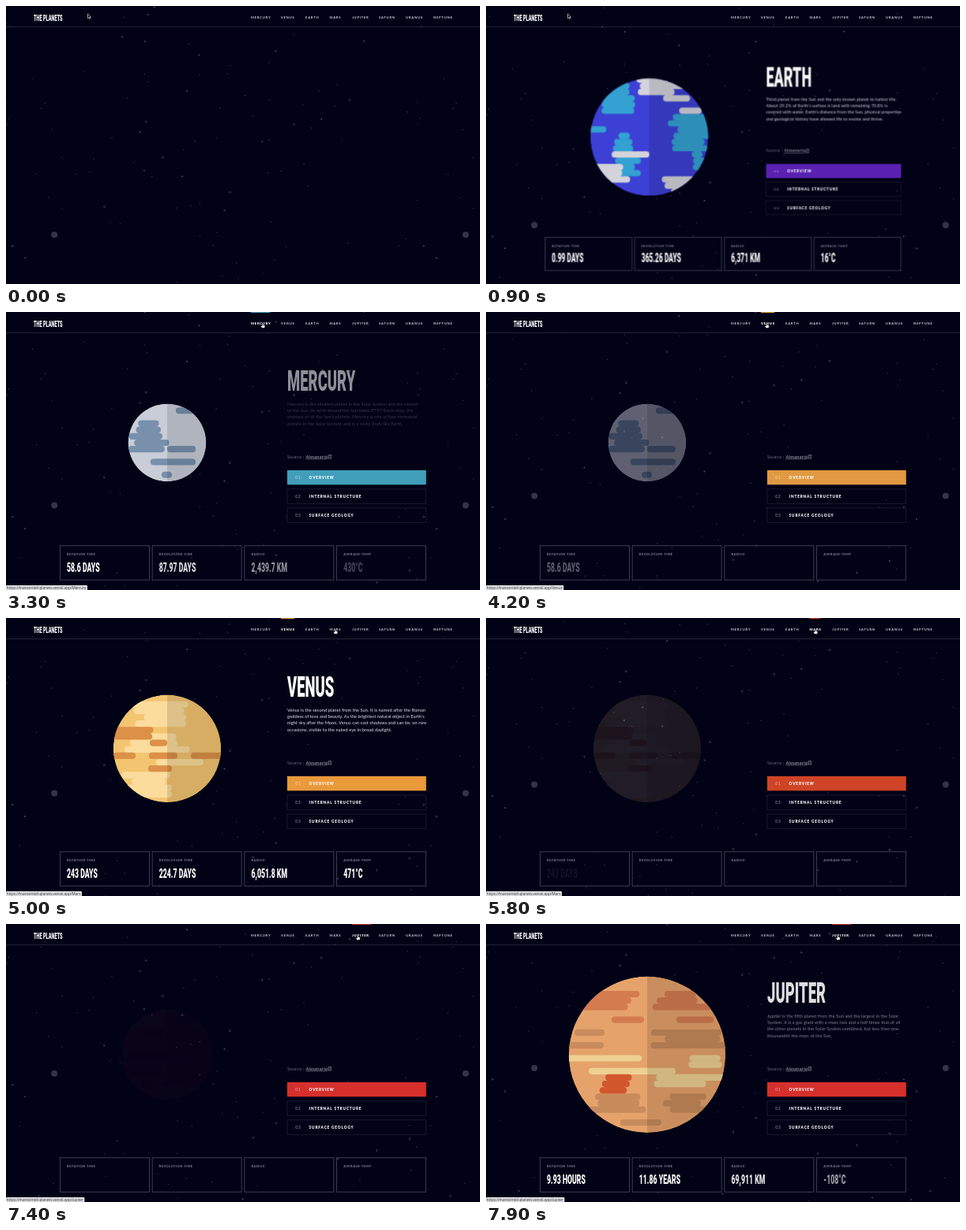
Recreate the animation shown at these times as an HTML page. Size 600 by 353 pixels, loop 8000 ms.

```html
<!DOCTYPE html>
<html lang="en">
<head>
<meta charset="utf-8">
<title>The Planets</title>
<style>
html, body { margin: 0; height: 100%; overflow: hidden; background: #020217; }
svg { display: block; width: 100vw; height: 100vh; }
text { font-family: Lato, "Open Sans", sans-serif; fill: #fff; white-space: pre; }
.display { font-family: Roboto, Inter, sans-serif; font-weight: 900; }
.nav { font-size: 4.2px; font-weight: 700; letter-spacing: .74px; fill: #d2d2da; }
.tab { font-size: 4.7px; font-weight: 900; letter-spacing: .86px; }
.num { fill-opacity: .65; font-weight: 400; }
.label { font-size: 3.9px; font-weight: 700; letter-spacing: .52px; fill: #8e8e9e; }
.body { font-size: 5.6px; letter-spacing: .09px; fill: #e8e8ee; }
.source { font-size: 5.7px; letter-spacing: .22px; fill: #70707e; }
.link { font-weight: 700; text-decoration: underline; fill: #8c8c96; }
.url { font-family: "Open Sans", sans-serif; font-size: 4.65px; fill: #333; }
</style>
</head>
<body>
<svg id="stage" viewBox="0 0 600 353" preserveAspectRatio="none"></svg>
<script>
const LOOP = 8000, CX = 204, CY = 165.8, ROW = 8.15, TILE = 520.7;
const NAV = { Mercury: 310, Venus: 348, Earth: 379, Mars: 409.5, Jupiter: 438, Saturn: 472, Uranus: 506, Neptune: 541 };
const STATS = ['ROTATION TIME', 'REVOLUTION TIME', 'RADIUS', 'AVERAGE TEMP'];

// patches: colour -> areas [first row, last row, left, right], counted from the middle row
const PLANETS = [
  { name: 'Earth', r: 76.7, mid: 164, base: '#3f42dc', accent: [92, 34, 184], enter: 250, patches: {
      '#35a6d8': [[-8, -4, 126, 194], [-3, 2, 228, 292], [3, 5, 256, 277], [0, 2, 156, 185], [-1, -1, 120, 148], [4, 6, 156, 194]],
      '#d9d9e2': [[-9, -7, 180, 258], [-6, -6, 222, 257], [-4, -4, 243, 272], [3, 3, 155, 204], [5, 7, 120, 182], [7, 9, 218, 280]] },
    text: ['Third planet from the Sun and the only known planet to harbor life.',
      'About 29.2% of Earth’s surface is land with remaining 70.8% is',
      'covered with water. Earth’s distance from the Sun, physical properties',
      'and geological history have allowed life to evolve and thrive.'],
    stats: ['0.99 DAYS', '365.26 DAYS', '6,371 KM', '16°C'] },
  { name: 'Mercury', r: 49.4, mid: 166, base: '#c8cdd8', accent: [65, 158, 187], click: 2415, patches: {
      '#7890ac': [[-5, -5, 215, 238], [-3, -2, 164, 202], [-1, 1, 145, 208], [1, 1, 204, 240], [3, 3, 183, 240], [5, 5, 197, 210]] },
    text: ['Mercury is the smallest planet in the Solar System and the closest',
      'to the Sun. Its orbit around the Sun takes 87.97 Earth days, the',
      'shortest of all the Sun’s planets. Mercury is one of four terrestrial',
      'planets in the Solar System, and is a rocky body like Earth.'],
    stats: ['58.6 DAYS', '87.97 DAYS', '2,439.7 KM', '430°C'] },
  { name: 'Venus', r: 68.2, mid: 166.8, base: '#f3c571', accent: [234, 153, 59], click: 3840, patches: {
      '#fbdc9c': [[-7, -4, 155, 245], [-2, 0, 136, 234], [2, 2, 190, 250], [4, 7, 145, 220]],
      '#dc9048': [[-3, -2, 125, 187], [-1, -1, 182, 204], [1, 1, 136, 164], [1, 1, 181, 217], [1, 1, 234, 276], [3, 3, 180, 210]] },
    text: ['Venus is the second planet from the Sun. It is named after the Roman',
      'goddess of love and beauty. As the brightest natural object in Earth’s',
      'night sky after the Moon, Venus can cast shadows and can be, on rare',
      'occasions, visible to the naked eye in broad daylight.'],
    stats: ['243 DAYS', '224.7 DAYS', '6,051.8 KM', '471°C'] },
  { name: 'Mars', r: 57.2, mid: 170, base: '#ff5f3a', accent: [207, 68, 37], click: 5330, patches: {
      '#e99a62': [[-7, -5, 146, 212], [-5, -5, 234, 243], [5, 6, 194, 252]],
      '#b4342e': [[-6, -6, 212, 248], [-4, -4, 176, 198], [0, 0, 140, 240], [2, 2, 140, 196], [2, 2, 208, 222], [4, 4, 170, 185], [4, 4, 196, 224]] },
    text: ['Mars is the fourth planet from the Sun and the second-smallest planet',
      'in the Solar System, being larger than only Mercury. In English, Mars',
      'carries the name of the Roman god of war and is often referred to as',
      'the “Red Planet”.'],
    stats: ['1.03 DAYS', '1.88 YEARS', '3,389.5 KM', '-28°C'] },
  { name: 'Jupiter', r: 99.2, mid: 170.5, base: '#e6a26b', accent: [214, 48, 44], click: 6900, patches: {
      '#d47b50': [[-10, -8, 110, 202], [-10, -8, 208, 286], [-6, -6, 159, 200], [-6, -6, 241, 288]],
      '#c88b5b': [[-4, -4, 112, 150], [-2, -2, 100, 149], [-4, -2, 206, 306], [6, 8, 130, 206], [6, 8, 214, 284], [10, 10, 170, 222]],
      '#eed091': [[0, 0, 100, 197], [2, 2, 130, 240], [0, 1, 235, 320], [3, 4, 188, 310]],
      '#d2572d': [[3, 5, 141, 186]] },
    text: ['Jupiter is the fifth planet from the Sun and the largest in the Solar',
      'System. It is a gas giant with a mass two and a half times that of all',
      'the other planets in the Solar System combined, but less than one-',
      'thousandth the mass of the Sun.'],
    stats: ['9.93 HOURS', '11.86 YEARS', '69,911 KM', '-108°C'] }
];
PLANETS.forEach((p, i) => {
  p.enter ??= p.click + 500;
  p.exit = PLANETS[i + 1]?.click ?? LOOP * 2;
});
const HOVERS = [
  { name: 'Mercury', at: 2000 }, { name: 'Venus', at: 3550 }, { name: 'Mars', at: 5000 }, { name: 'Jupiter', at: 6350 }
];

const clamp = v => Math.max(0, Math.min(1, v));
const ramp = (t, from, to) => clamp((t - from) / (to - from));
const smooth = k => k * k * (3 - 2 * k);
const random = seed => () => (seed = seed * 16807 % 2147483647) / 2147483647;
const $ = id => document.getElementById(id);
const show = (id, v) => $(id).setAttribute('opacity', v.toFixed(3));

const text = (x, y, cls, s, extra = '') => `<text x="${x}" y="${y}" class="${cls}" ${extra}>${s}</text>`;
const rect = (x, y, w, h, attrs) => `<rect x="${x}" y="${y}" width="${w}" height="${h}" ${attrs}/>`;
const display = (x, y, size, s, id = '') =>
  `<text class="display" ${id && `id="${id}"`} font-size="${size}" transform="translate(${x} ${y}) scale(.5 1)">${s}</text>`;
const statX = i => 68.4 + i * 116.75;

function starField() {
  const rnd = random(4242);
  const star = (x, y, r, a) => [x, x + TILE].map(sx =>
    `<circle cx="${sx}" cy="${y}" r="${r}" fill="#fff" opacity="${a}"/>`).join('');
  let out = star(61.2, 290.5, 4, .2);
  for (let i = 0; i < 125; i++) {
    const bright = i % 4 === 0;
    out += star(rnd() * TILE, rnd() * 465, bright ? 1.15 : .75, bright ? .24 : .2);
  }
  return out;
}

// Rows of round-ended strokes; taller patches get ragged sides.
function patchPath(areas, mid, rnd) {
  return areas.map(([first, last, left, right]) => {
    const ragged = first === last ? 0 : (right - left) * .28;
    let d = '';
    for (let row = first; row <= last; row++)
      d += `M${left + 4 + rnd() * ragged} ${mid + row * ROW}H${right - 4 - rnd() * ragged}`;
    return d;
  }).join('');
}

function planet(p, i) {
  const rnd = random(911 + i * 37);
  const patches = Object.entries(p.patches).map(([color, areas]) =>
    `<path stroke="${color}" d="${patchPath(areas, p.mid, rnd)}"/>`).join('');
  return `<clipPath id="clip${i}"><circle cx="${CX}" cy="${CY}" r="${p.r}"/></clipPath>
    <g id="planet${i}" clip-path="url(#clip${i})" stroke-width="8.2" stroke-linecap="round">
      <circle cx="${CX}" cy="${CY}" r="${p.r}" fill="${p.base}"/>${patches}
      ${rect(CX, CY - p.r, p.r, p.r * 2, 'opacity=".12"')}</g>
    ${display(356, 99.8, 37, p.name.toUpperCase(), 'title' + i)}
    <g id="body${i}">${p.text.map((s, n) => text(356, 118.8 + n * 8.3, 'body', s)).join('')}</g>
    ${p.stats.map((s, n) => display(statX(n) + 8.6, 329.6, 17.4, s, `stat${i}${n}`)).join('')}`;
}

const tabs = ['OVERVIEW', 'INTERNAL STRUCTURE', 'SURFACE GEOLOGY'].map((s, i) => {
  const y = 200.9 + i * 24;
  return rect(356, y, 175.8, 18.4, i ? 'fill="none" stroke="#232338" stroke-width=".7"' : 'id="overview"') +
    text(366.3, y + 10.9, 'tab num', '0' + (i + 1)) + text(383.6, y + 10.9, 'tab', s);
}).join('');

const boxes = STATS.map((s, i) =>
  rect(statX(i), 296.8, 113, 43.4, 'fill="none" stroke="#4c4c60" stroke-width=".8"') +
  text(statX(i) + 8.5, 309.3, 'label', s)).join('');

const nav = Object.entries(NAV).map(([name, x]) =>
  text(x, 15.6, 'nav', name.toUpperCase(), `id="nav${name}"`)).join('');

const lines = HOVERS.map(({ name }) => {
  const { accent } = PLANETS.find(p => p.name === name);
  return rect(NAV[name], 0, name.length * 3.45, 1, `id="line${name}" fill="rgb(${accent})"`);
}).join('');

$('stage').innerHTML = `
  <g id="stars">${starField()}</g>
  <path d="M0 26.5H600" stroke="#2b2b40" stroke-width=".8"/>
  ${display(35, 19, 11.2, 'THE PLANETS')}${nav}${lines}
  <g id="main">${PLANETS.map(planet).join('')}
    ${text(356, 185.6, 'source', 'Source : <tspan class="link">Almanaria</tspan>')}
    <path d="M410 181.8H407.8V186H411.6V184M408.8 184.8L411.6 181.8M409.8 181.8H411.6V183.4" fill="none" stroke="#85858f" stroke-width=".8"/>
    ${tabs}${boxes}</g>
  <g id="status">${rect(0, 347, 100, 8, 'id="statusBox" rx="1" fill="#dfe1e6"')}
    <text id="url" class="url" x=".8" y="352"></text></g>
  <g id="pointer" stroke-linejoin="round">
    <path id="arrow" d="M0 0V5.6L1.3 4.4L2.2 6.4L3.1 6L2.2 4.1H4Z" fill="#000" stroke="#fff" stroke-width=".6"/>
    <path id="hand" d="M-.6 0Q0-.7 .6 0V2L2.9 2.6V4.6L2.2 6H-.9L-2.3 3.6L-1.6 3L-.6 3.8Z" fill="#fff" stroke="#111" stroke-width=".4"/>
  </g>`;

// The pointer glides to each hovered link in turn.
function pointerAt(t) {
  return HOVERS.reduce(([x, y], { name, at }) => {
    const k = smooth(ramp(t, at - 350, at));
    return [x + (NAV[name] + 7.3 - x) * k, y + (14.3 - y) * k];
  }, [103.5, 10]);
}

function draw(now) {
  const t = Math.floor(now % LOOP / 100) * 100;
  $('stars').setAttribute('transform', `translate(0 ${-t * .0136})`);

  const rest = 1 - ramp(t, 100, 1300), size = 1 - .25 * rest * rest;
  $('main').setAttribute('transform', `translate(300 190) scale(${size}) translate(-300 -190)`);
  show('main', ramp(t, 100, 920));

  PLANETS.forEach((p, i) => {
    const e = t - p.enter, d = t - p.exit;
    const fade = (in0, in1, out0, out1) => ramp(e, in0, in1) * (1 - ramp(d, out0, out1));
    show('planet' + i, fade(0, 350, 190, 510));
    show('title' + i, fade(180, 550, 60, 260));
    show('body' + i, fade(300, 660, 0, 240));
    p.stats.forEach((_, n) => show(`stat${i}${n}`, fade(n * 100, n * 100 + 330, 120 - n * 50, n ? 280 - n * 40 : 490)));
  });

  const active = PLANETS.findLastIndex(p => !p.click || p.click <= t), cur = PLANETS[active];
  const from = PLANETS[Math.max(0, active - 1)].accent, k = cur.click ? ramp(t - cur.click, 0, 380) : 1;
  $('overview').setAttribute('fill', `rgb(${from.map((c, i) => Math.round(c + (cur.accent[i] - c) * k))})`);

  HOVERS.forEach(({ name, at }) => {
    const p = PLANETS.find(q => q.name === name);
    show('line' + name, ramp(t, at, at + 150) * (1 - ramp(t, p.exit, p.exit + 200)));
    $('nav' + name).style.fill = p === cur ? '#fff' : '';
    $('nav' + name).style.fontWeight = p === cur ? 900 : '';
  });

  const hover = HOVERS.findLast(h => h.at <= t);
  show('status', hover ? 1 : 0);
  if (hover) {
    $('url').textContent = 'https://marovintell-planets.vercel.app/' + hover.name;
    $('statusBox').setAttribute('width', $('url').getComputedTextLength() + 2.4);
  }

  $('pointer').setAttribute('transform', `translate(${pointerAt(t)})`);
  show('arrow', hover ? 0 : 1);
  show('hand', hover ? 1 : 0);
  requestAnimationFrame(draw);
}
requestAnimationFrame(draw);
</script>
</body>
</html>
```
